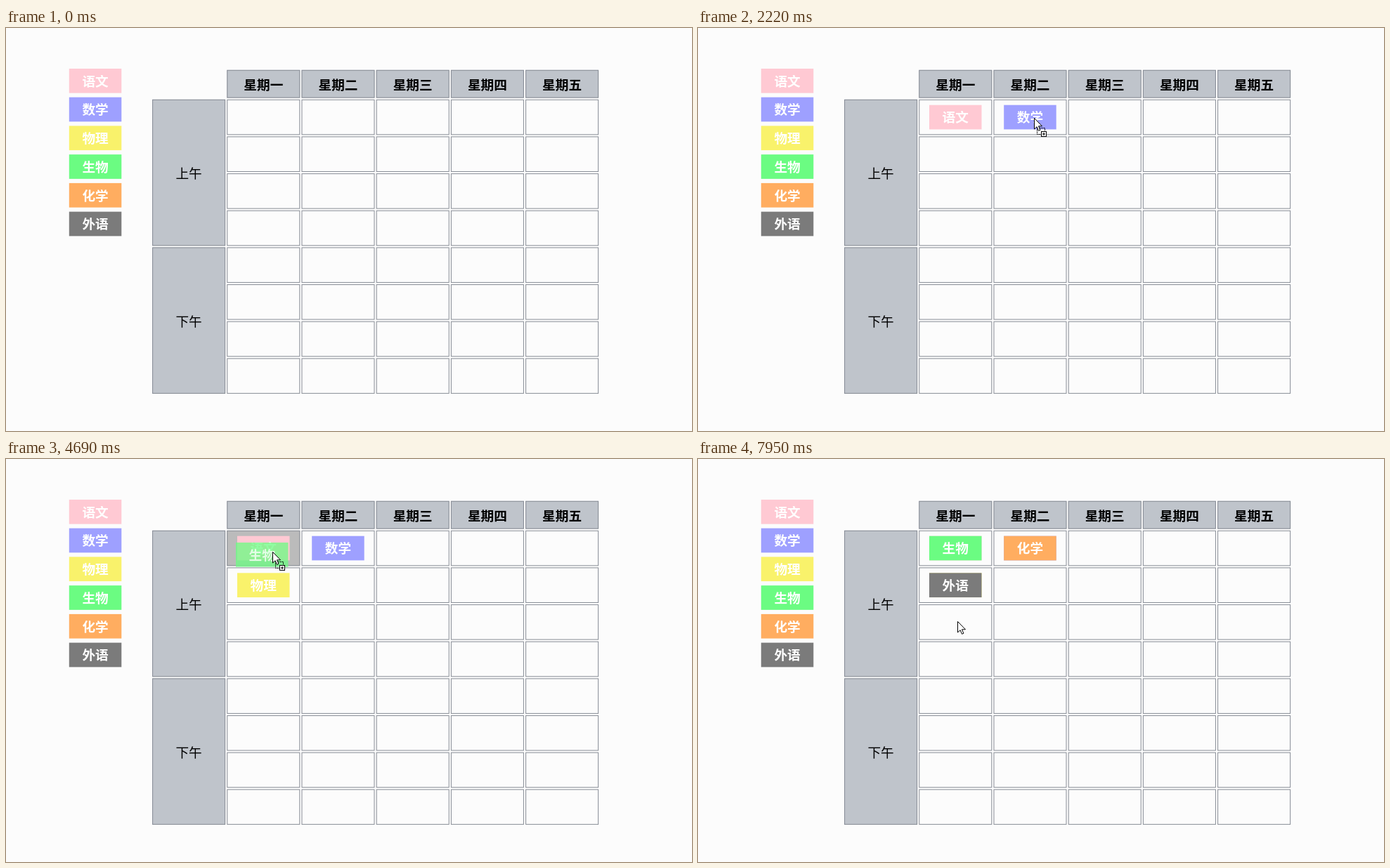
Write an HTML page with a canvas that moves like this. It is 976 px wide and 574 px high and loops after 7990 ms.

```html
<!DOCTYPE html>
<html lang="zh-CN">
<head>
<meta charset="utf-8">
<title>课程表</title>
<style>
html, body { margin: 0; width: 100%; height: 100%; overflow: hidden; background: #fcfcfc; }
canvas { display: block; }
</style>
</head>
<body>
<canvas id="stage" width="976" height="574"></canvas>
<script>
const ctx = document.getElementById('stage').getContext('2d');
const LOOP = 7990, PAUSE = 40;
const FONT = '18.67px "Noto Sans CJK SC", "Noto Sans CJK", sans-serif';
const HEAD = '#bfc4cb', LINE = '#878c95', HOVER = '#bbbbbb';
const GRID = { x: 314.3, y: 101.8, dx: 106.2, dy: 52.65, w: 104, h: 50.5 };
const CHIP = { w: 74.5, h: 34.7 };
const POOL = { x: 89.8, y: 57.9, dy: 40.75 };
const ARROW = new Path2D('M0 0V15.5L3.6 12.2L6 17.8L8.4 16.8L6 11.3H11Z');

// One entry per subject: where the chip is held, where the pointer ends,
// and the times it reaches the chip, lifts it, stops and lets go.
const DRAGS = [
  { name: '语文', color: '#ffc9d3', hold: [24, 10], end: [374, 122], reach: 660, lift: 860, stop: 1160, drop: 1260 },
  { name: '数学', color: '#9ea0ff', hold: [41, 17], end: [478, 128], reach: 1790, lift: 1840, stop: 2170, drop: 2200 },
  { name: '物理', color: '#f9f26b', hold: [54, 10], end: [366, 173], reach: 2700, lift: 3260, stop: 3560, drop: 3650 },
  { name: '生物', color: '#6bfc82', hold: [52, 13], end: [379, 132], reach: 4220, lift: 4280, stop: 4680, drop: 4920 },
  { name: '化学', color: '#ffad60', hold: [45, 13], end: [474, 129], reach: 5580, lift: 5720, stop: 6130, drop: 6190 },
  { name: '外语', color: '#7b7b7b', hold: [44, 13], end: [399, 183], reach: 7040, lift: 7180, stop: 7600, drop: 7670 }
];
DRAGS.forEach((d, i) => {
  d.y = POOL.y + POOL.dy * i;
  d.grab = [POOL.x + d.hold[0], d.y + d.hold[1]];
  d.cell = cellAt(d.end);
});
const ENTRY = { end: [357, 562], drop: 160 };
const EXIT = { grab: [369, 231], leave: 7830, reach: 7960 };

const easeBoth = u => u * u * (3 - 2 * u);
const easeOut = u => 1 - (1 - u) ** 3;

function glide(t, t0, t1, a, b, ease) {
  const s = ease(Math.min(1, Math.max(0, (t - t0) / (t1 - t0))));
  return a.map((v, k) => v + (b[k] - v) * s);
}

function pointer(t) {
  if (t >= EXIT.leave) return glide(t, EXIT.leave, EXIT.reach, DRAGS[5].end, EXIT.grab, easeOut);
  let last = ENTRY;
  for (const d of DRAGS) {
    if (t < d.lift) return glide(t, last.drop + PAUSE, d.reach, last.end, d.grab, easeOut);
    if (t < d.drop + PAUSE) return glide(t, d.lift, d.stop, d.grab, d.end, easeBoth);
    last = d;
  }
  return last.end;
}

function cellAt([x, y]) {
  const c = Math.floor((x - GRID.x) / GRID.dx), r = Math.floor((y - GRID.y) / GRID.dy);
  return c >= 0 && c < 5 && r >= 0 && r < 8 ? [c, r] : null;
}

function label(text, x, y, weight, color) {
  ctx.font = weight + ' ' + FONT;
  ctx.fillStyle = color;
  ctx.textAlign = 'center';
  ctx.fillText(text, x, y + 7);
}

function box(x, y, w, h, fill) {
  if (fill) {
    ctx.fillStyle = fill;
    ctx.fillRect(x, y, w, h);
  }
  ctx.lineWidth = 1;
  ctx.strokeStyle = LINE;
  ctx.strokeRect(x + .5, y + .5, w - 1, h - 1);
}

function chip({ name, color }, x, y) {
  ctx.fillStyle = color;
  ctx.fillRect(x, y, CHIP.w, CHIP.h);
  label(name, x + CHIP.w / 2, y + CHIP.h / 2 + .3, 'bold', '#fff');
}

function table(hover) {
  const { x, y, dx, dy, w, h } = GRID;
  [...'一二三四五'].forEach((day, c) => {
    const left = x + dx * c;
    box(left, 59.8, w, 39.8, HEAD);
    label('星期' + day, left + w / 2, 81, 'bold', '#000');
    for (let r = 0; r < 8; r++) {
      const over = hover && hover[0] === c && hover[1] === r;
      box(left, y + dy * r, w, h, over && HOVER);
    }
  });
  ['上午', '下午'].forEach((name, i) => {
    const top = y + dy * 4 * i, tall = dy * 3 + h;
    box(x - dx, top, w, tall, HEAD);
    label(name, x - dx + w / 2, top + tall / 2 + 1, '400', '#000');
  });
}

function cursor(x, y, copying) {
  ctx.save();
  ctx.translate(Math.round(x) + .5, Math.round(y) + .5);
  ctx.lineWidth = 1;
  ctx.strokeStyle = '#000';
  ctx.fillStyle = '#fff';
  if (copying) {
    ctx.setLineDash([2, 1]);
    ctx.strokeRect(4, 14, 11, 9);
    ctx.setLineDash([]);
    ctx.fillRect(10, 19, 7, 7);
    ctx.strokeRect(10, 19, 7, 7);
    ctx.fillStyle = '#000';
    ctx.fillRect(11.5, 22, 4, 1);
    ctx.fillRect(13, 20.5, 1, 4);
    ctx.fillStyle = '#fff';
  }
  ctx.fill(ARROW);
  ctx.stroke(ARROW);
  ctx.restore();
}

function draw(t) {
  ctx.fillStyle = '#fcfcfc';
  ctx.fillRect(0, 0, 976, 574);
  const [x, y] = pointer(t);
  const drag = DRAGS.find(d => t > d.lift && t < d.drop);
  table(drag && cellAt([x, y]));
  for (const d of DRAGS) {
    chip(d, POOL.x, d.y);
    const [c, r] = d.cell;
    if (t >= d.drop) chip(d, GRID.x + GRID.dx * c + 14.7, GRID.y + GRID.dy * r + 7.9);
  }
  if (drag) {
    ctx.globalAlpha = .75;
    chip(drag, x - drag.hold[0], y - drag.hold[1]);
    ctx.globalAlpha = 1;
  }
  const copying = DRAGS.some(d => t > d.lift && t < d.drop + PAUSE);
  if (t >= ENTRY.drop + PAUSE) cursor(x, y, copying);
}

const start = performance.now();
function tick() {
  draw((performance.now() - start) % LOOP);
  requestAnimationFrame(tick);
}
tick();
</script>
</body>
</html>
```
